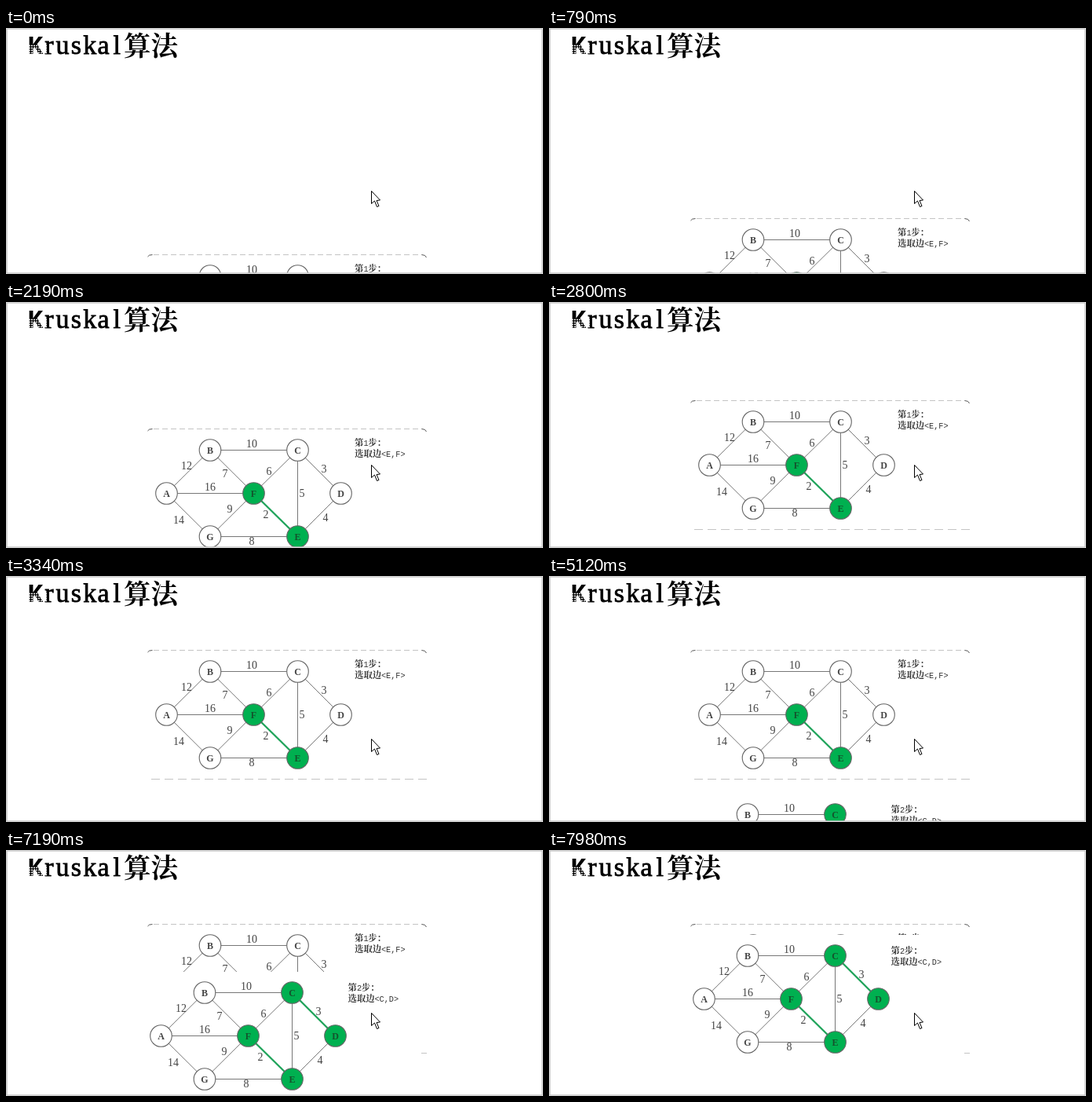
Recreate the animation shown at these times as an HTML page with a canvas. Size 684 by 313 pixels, loop 8000 ms.

```html
<!DOCTYPE html>
<html lang="zh">
<head>
<meta charset="utf-8">
<style>
html, body { margin: 0; width: 100%; height: 100%; overflow: hidden; background: #fff; }
canvas { display: block; }
</style>
</head>
<body>
<canvas id="stage" width="684" height="313"></canvas>
<script>
const ctx = document.getElementById('stage').getContext('2d');
const LOOP = 8000, SLIDE1_END = 3340, SLIDE2_START = 4730, SLIDE2_END = 7980;
const SERIF = '"Liberation Serif", serif';
const MONO = '"Liberation Mono", monospace';
const CJK = '"Noto Serif CJK SC", "Noto Sans CJK SC", "Noto Sans CJK", sans-serif';

// Bursts of stepped motion: start, end, number of steps
const bursts = [
  [100, 870, 11], [940, 1710, 11], [1810, 2570, 11], [2650, 3340, 10],
  [4730, 5500, 11], [5570, 6340, 11], [6420, 7190, 11], [7290, 7980, 10]
];
const nodes = {
  A: [204.5, 176.5], B: [260, 121.5], C: [371.5, 121.5], D: [426.5, 176.5],
  E: [371.5, 231.5], F: [315.5, 176.5], G: [260, 231.5]
};
// Edge, weight, centre of the weight label
const edges = [
  ['AB', 12, 230, 142], ['BC', 10, 313, 114], ['AF', 16, 260, 169], ['AG', 14, 220, 211],
  ['BF', 7, 279, 152], ['CF', 6, 335, 149], ['CD', 3, 405, 146], ['CE', 5, 377, 177],
  ['FG', 9, 285, 197], ['EF', 2, 331, 204], ['EG', 8, 313, 238], ['DE', 4, 407, 208]
];

function snap(t) {
  let held = 0;
  for (const [start, end, count] of bursts) {
    if (t < start) break;
    const step = (end - start) / (count - 1);
    held = Math.min(end, start + Math.floor((t - start) / step + 0.1) * step);
  }
  return held;
}

function text(str, x, y, font, color, align = 'center') {
  ctx.font = font;
  ctx.fillStyle = color;
  ctx.textAlign = align;
  ctx.fillText(str, x, y);
}

function line(x1, y1, x2, y2, color, width = 1, dash = []) {
  ctx.strokeStyle = color;
  ctx.lineWidth = width;
  ctx.setLineDash(dash);
  ctx.beginPath();
  ctx.moveTo(x1, y1);
  ctx.lineTo(x2, y2);
  ctx.stroke();
  ctx.setLineDash([]);
}

function graph(chosen) {
  for (const [edge] of edges) {
    const on = chosen.includes(edge);
    line(...nodes[edge[0]], ...nodes[edge[1]], on ? '#1fa35a' : '#777', on ? 2.3 : 1);
  }
  for (const [, weight, x, y] of edges) text(weight, x, y + 4, '14px ' + SERIF, '#444');
  const reached = chosen.join('');
  for (const name in nodes) {
    const [x, y] = nodes[name];
    const on = reached.includes(name);
    ctx.beginPath();
    ctx.arc(x, y, 13.8, 0, 7);
    ctx.fillStyle = on ? '#00b050' : '#fff';
    ctx.fill();
    ctx.strokeStyle = '#666';
    ctx.lineWidth = 1.1;
    ctx.stroke();
    text(name, x, y + 4, 'bold 12px ' + SERIF, on ? '#14532d' : '#444');
  }
}

function caption(step, edge, x, y) {
  const put = (str, dx, dy, cjk) =>
    text(str, x + dx, y + dy, cjk ? 'bold 11.4px ' + CJK : '10.2px ' + MONO, '#333', 'left');
  put('第', 0, 0, true);
  put(step, 11.4, 0);
  put('步：', 17.2, 0, true);
  put('选取边', 0, 14, true);
  put(`<${edge[0]},${edge[1]}>`, 34, 14);
}

function corner(x, y, dir) {
  ctx.strokeStyle = '#555';
  ctx.lineWidth = 1;
  ctx.beginPath();
  ctx.moveTo(x, y);
  ctx.quadraticCurveTo(x + dir, 94.5, x + 6 * dir, 94.5);
  ctx.stroke();
}

function firstSlide(y) {
  ctx.save();
  ctx.translate(0, y);
  line(188, 94.5, 530, 94.5, '#c4c4c4', 1, [7, 4]);
  corner(180.5, 97, 1);
  corner(535.5, 98, -1);
  line(536, 258.5, 180, 258.5, '#c4c4c4', 1, [11, 6]);
  graph(['EF']);
  caption('1', 'EF', 444, 116);
  ctx.restore();
}

function secondSlide(y) {
  ctx.save();
  ctx.translate(-7, y);
  ctx.fillStyle = '#fff';
  ctx.fillRect(185, 95, 351, 205);
  graph(['EF', 'CD']);
  caption('2', 'CD', 442.5, 119);
  ctx.restore();
}

function title() {
  ctx.strokeStyle = '#000';
  ctx.lineWidth = 0.8;
  [...'Kruskal'].forEach((ch, i) => {
    const x = 37.5 + i * 17.3;
    text(ch, x, 33, i ? '34px ' + SERIF : 'bold 33px ' + MONO, '#000');
    if (i) ctx.strokeText(ch, x, 33);
  });
  text('算法', 150, 34.5, 'bold 34.5px ' + CJK, '#000', 'left');
  for (let y = 22.5; y < 34; y += 3) line(29, y, 53, y, '#fff', 1.5, [2, 1]);
}

function cursor() {
  ctx.beginPath();
  for (const [x, y] of [[0, 0], [0, 16], [4, 12.5], [7, 20], [9.5, 19], [6.5, 12], [11, 11.5]])
    ctx.lineTo(465.5 + x, 207.5 + y);
  ctx.closePath();
  ctx.fillStyle = '#fff';
  ctx.fill();
  ctx.strokeStyle = '#000';
  ctx.lineWidth = 1;
  ctx.stroke();
}

function draw(now) {
  const t = snap(now % LOOP);
  ctx.fillStyle = '#fff';
  ctx.fillRect(0, 0, 684, 313);
  title();
  ctx.save();
  ctx.beginPath();
  ctx.rect(2, 2, 680, 310);
  ctx.clip();
  firstSlide(Math.round(0.0582 * Math.max(0, SLIDE1_END - t)));
  if (t >= SLIDE2_START) secondSlide(13 + Math.ceil(0.0588 * (SLIDE2_END - t)));
  ctx.restore();
  cursor();
  ctx.strokeStyle = '#c6c6c6';
  ctx.lineWidth = 1.6;
  ctx.strokeRect(1, 1, 682, 311);
}

const begin = performance.now();
function tick() {
  draw(performance.now() - begin);
  requestAnimationFrame(tick);
}
tick();
</script>
</body>
</html>
```
